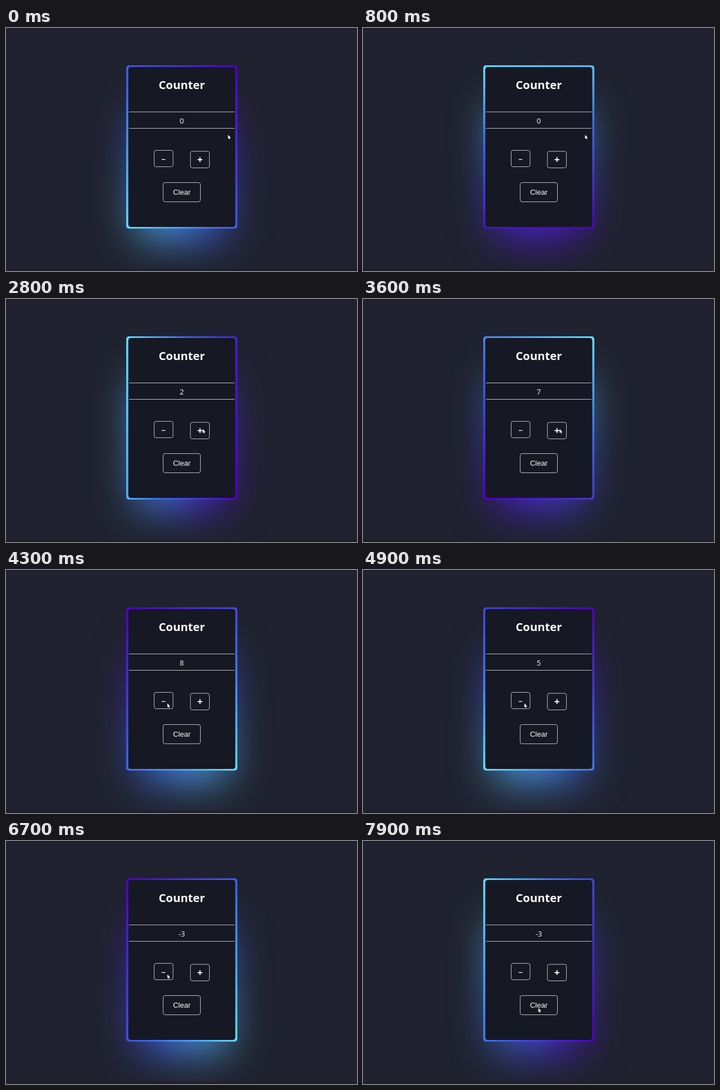
An HTML page for the animation above (8 s loop, 622 by 430 pixels).

```html
<!DOCTYPE html>
<html lang="en">
<head>
<meta charset="utf-8">
<title>Counter</title>
<style>
  html, body { margin: 0; width: 100%; height: 100%; overflow: hidden; background: #20222f; }
  #stage { position: relative; width: 622px; height: 430px; overflow: hidden; background: #20222f; }
  #stage > * { position: absolute; }
  .spin { background-image: linear-gradient(var(--angle, 55deg), #5ddcff, #3c67e3 43%, #4e00c2); }
  #glow { left: 217px; top: 116px; width: 189px; height: 283px; transform: scale(.8); filter: blur(47px); }
  #rim { left: 213px; top: 66px; width: 197px; height: 289px; border-radius: 5px; }
  svg { left: 0; top: 0; }
  text { fill: #fff; text-anchor: middle; }
  .ui { font-family: "Open Sans", "Noto Sans", sans-serif; }
  .btn { font-family: "Liberation Sans", Arial, sans-serif; }
  .frame { fill: none; stroke: #bcbcc2; stroke-width: 1; }
</style>
</head>
<body>
<div id="stage">
  <div id="glow" class="spin"></div>
  <div id="rim" class="spin"></div>
  <svg width="622" height="430" viewBox="0 0 622 430">
    <rect width="622" height="2" fill="#1d1e2a"/>
    <rect y="426" width="622" height="4" fill="#1d1e2a" opacity=".8"/>
    <rect x="216.7" y="69" width="189.6" height="283" rx="4.5" fill="#161823"/>
    <text class="ui" x="311.5" y="108" font-size="20.3" font-weight="700">Counter</text>
    <path class="frame" d="M218 148.5H405M218 177.5H405"/>
    <text id="count" class="ui" x="311.5" y="168.5" font-size="13">0</text>
    <g class="frame">
      <rect x="262.5" y="216.5" width="33.5" height="29" rx="3.5"/>
      <rect x="326.8" y="218.2" width="33.7" height="29.3" rx="3.5"/>
      <rect x="278.5" y="273.5" width="66" height="34" rx="3.5"/>
    </g>
    <text class="btn" x="279" y="235.9" font-size="13" font-weight="700">–</text>
    <text class="btn" x="343.6" y="238" font-size="17" font-weight="700">+</text>
    <text class="btn" x="311.5" y="295.2" font-size="13">Clear</text>
    <path id="cursor" d="M0 0V7.3L1.7 5.8L2.8 8.3L3.9 7.8L2.8 5.4H5Z"
          fill="#fff" stroke="#0b0c12" stroke-width=".6" paint-order="stroke"/>
  </svg>
</div>
<script>
  const LOOP = 8000, STEP = 100, SPIN = 2500, START_ANGLE = 55;
  const stage = document.getElementById("stage");
  const count = document.getElementById("count");
  const cursor = document.getElementById("cursor");

  // Cursor stops: time, x, y
  const stops = [
    [0, 393.5, 189], [900, 393.5, 189], [1600, 365.5, 212], [2200, 348.5, 230],
    [3800, 348.5, 230], [4150, 286, 236], [6800, 286, 236], [7600, 310.8, 295.6], [LOOP, 310.8, 295.6]
  ];

  const clicks = (t, first, gap, max) =>
    t < first ? 0 : Math.min(max, 1 + Math.floor((t - first) / gap));

  const countAt = t => clicks(t, 2500, 160, 9) - clicks(t, 4250, 200, 12);

  function cursorAt(t) {
    const i = stops.findIndex(s => s[0] > t);
    const [t0, x0, y0] = stops[i - 1], [t1, x1, y1] = stops[i];
    const p = (t - t0) / (t1 - t0), k = p * p * (3 - 2 * p);
    return [x0 + (x1 - x0) * k, y0 + (y1 - y0) * k];
  }

  function draw(now) {
    const t = Math.floor((now % LOOP) / STEP) * STEP;
    stage.style.setProperty("--angle", (START_ANGLE + t / SPIN * 360) % 360 + "deg");
    count.textContent = countAt(t);
    cursor.setAttribute("transform", `translate(${cursorAt(t)})`);
  }

  const begin = performance.now();
  function tick() {
    draw(performance.now() - begin);
    requestAnimationFrame(tick);
  }
  tick();
</script>
</body>
</html>
```
